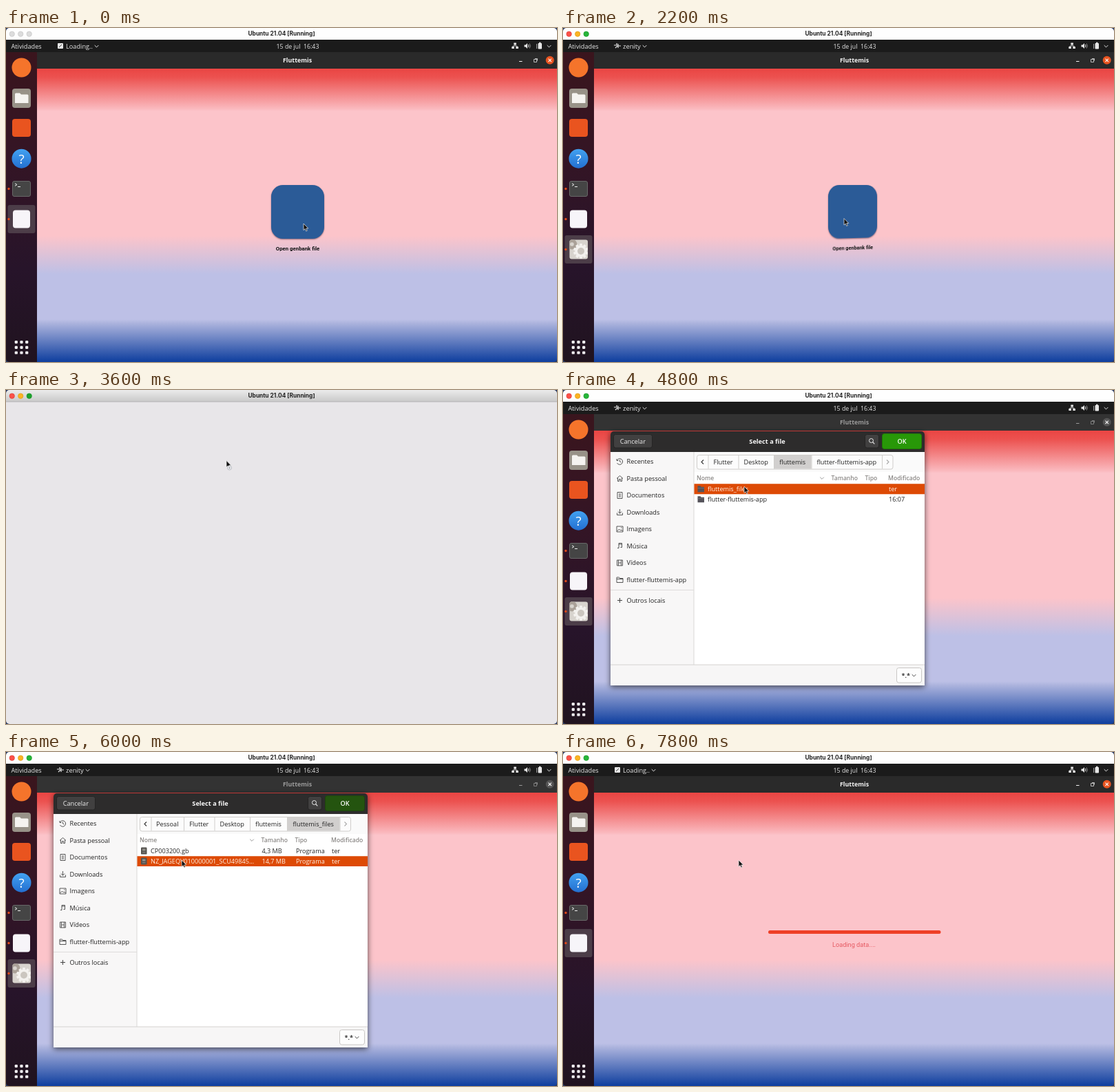
Write an HTML page with a canvas that moves like this. It is 800 by 485 pixels and loops after 8 s.

```html
<!DOCTYPE html>
<html lang="pt">
<head>
<meta charset="utf-8">
<title>Fluttemis</title>
<style>
html, body { margin: 0; width: 100%; height: 100%; overflow: hidden; background: #fff; }
canvas, #tile, #cursor { position: absolute; left: 0; top: 0; display: block; }
#tile { left: 385px; top: 228px; width: 77px; height: 100px; transform-origin: 0 0; }
#tile i { display: block; width: 77px; height: 78px; border-radius: 17px; background: #2b5b97; box-shadow: 0 1px 2px rgba(60, 30, 50, .55); }
#tile b { position: absolute; left: -10px; right: -10px; top: 87px; text-align: center; white-space: nowrap; font: 600 7.8px/12px Roboto, sans-serif; color: #111; }
#cursor { width: 14px; height: 18px; overflow: visible; }
</style>
</head>
<body>
<canvas id="stage" width="800" height="485"></canvas>
<div id="tile"><i></i><b>Open genbank file</b></div>
<svg id="cursor" viewBox="0 0 14 18">
  <path d="M0 0V9.6L2.2 7.6L3.7 11L5.3 10.3L3.8 7H6.8Z" fill="#111" stroke="#eee" stroke-width=".7"/>
  <g id="badge"><circle cx="4.5" cy="10.5" r="3" fill="#f4f4f6" stroke="#a9adb5" stroke-width=".8"/><path d="M3 10.5H6M4.5 9V12" stroke="#8d929a" stroke-width=".7"/></g>
</svg>
<script>
const LOOP = 8000, STEP = 200;
const FOCUS = 400, LAUNCH = 1800, DIALOG = 2600, BLANK = 3600, BLANK_END = 3800,
      PICK_DIR = 4600, OPEN_DIR = 5000, PICK_FILE = 5800, PRESS = 6000, CLOSE = 6200;
const UI = '"Open Sans", "Noto Sans", sans-serif';
const ORANGE = '#dd4a05', INK = '#222', PALE = '#e6e6e6';
const g = document.getElementById('stage').getContext('2d');
const tile = document.getElementById('tile');
const cursor = document.getElementById('cursor');
const badge = document.getElementById('badge');

function box(x, y, w, h, fill, r = 0, stroke) {
  g.beginPath();
  g.roundRect(x, y, w, h, r);
  if (fill) { g.fillStyle = fill; g.fill(); }
  if (stroke) { g.strokeStyle = stroke; g.lineWidth = 1; g.stroke(); }
}
function disc(x, y, r, fill, stroke, width = 1) {
  g.beginPath();
  g.arc(x, y, r, 0, 7);
  if (fill) { g.fillStyle = fill; g.fill(); }
  if (stroke) { g.strokeStyle = stroke; g.lineWidth = width; g.stroke(); }
}
function line(d, color, width = 1) {
  g.strokeStyle = color;
  g.lineWidth = width;
  g.stroke(new Path2D(d));
}
function shape(d, color) {
  g.fillStyle = color;
  g.fill(new Path2D(d));
}
function text(s, x, y, color = INK, size = 9.2, weight = 500, align = 'left', family = UI) {
  g.font = `${weight} ${size}px ${family}`;
  g.textAlign = align;
  g.fillStyle = color;
  g.fillText(s, x, y);
}
function fade(y0, y1, ...stops) {
  const f = g.createLinearGradient(0, y0, 0, y1);
  stops.forEach(([at, c]) => f.addColorStop(at, c));
  return f;
}
function at(x, y, draw) {
  g.save();
  g.translate(x, y);
  draw();
  g.restore();
}
const chevron = (x, y, color) => at(x, y, () => line('M-2.8-1.4L0 1.4L2.8-1.4', color));

function titleBar(t, blank) {
  box(0, 0, 800, 17, blank ? fade(0, 17, [0, '#ebebeb'], [1, '#c9c9c9']) : '#fefefe');
  if (blank) box(0, 16.5, 800, 1, '#b5b3b6');
  const colors = t < FOCUS ? ['#dcdcdc', '#dcdcdc', '#dcdcdc']
    : ['#fb5148', '#fbb422', blank ? '#1ea02d' : '#27b53a'];
  const rims = t < FOCUS ? ['#c6c6c6', '#c6c6c6', '#c6c6c6'] : ['#df3f38', '#dd9a1c', '#189a29'];
  colors.forEach((c, i) => disc(8.7 + i * 12.5, 8.7, 3.7, c, rims[i], .7));
  text('Ubuntu 21.04 [Running]', 400, 11.4, '#222', 8.4, 700, 'center', 'Inter, sans-serif');
}

function topBar(zenity) {
  box(0, 17, 800, 18, '#1b1b1b');
  text('Atividades', 7.5, 29.5, PALE);
  if (zenity) {
    line('M74 25H78V22M76 29L79 26H84M80 23V29', PALE, 1.2);
    text('zenity', 87, 29.5, PALE, 9.4);
    chevron(118.5, 26.5, PALE);
  } else {
    box(75, 22, 8, 8, PALE, 1);
    line('M77 28L81 24', '#444');
    text('Loading..', 87, 29.5, PALE);
    chevron(131.5, 26.5, PALE);
  }
  text('15 de jul  16:43', 423.5, 29.5, PALE, 8.8, 500, 'center');
  box(737.3, 21.5, 3.6, 3, PALE);
  box(734.3, 27, 3.6, 3, PALE);
  box(740.3, 27, 3.6, 3, PALE);
  line('M739 24V26H736V28M739 26H742V28', PALE, .8);
  shape('M752.5 24.5H754.5L757 22V30L754.5 27.5H752.5Z', PALE);
  line('M758.3 24Q760 26 758.3 28', PALE);
  line('M760 22.5Q762.8 26 760 29.5', '#8a8a8a');
  box(772.5, 22, 5.5, 8.5, PALE, 1);
  box(774, 20.8, 2.5, 1.5, PALE);
  line('M770.5 23V30', '#999');
  chevron(788.5, 26.5, PALE);
}

function gears() {
  box(9.5, 307.5, 26.5, 28, '#d8d4ce', 3);
  g.save();
  g.clip();
  disc(13, 314, 7, '#aaa198', '#aaa198');
  disc(13, 314, 2.8, '#d8d4ce');
  at(26, 324, () => {
    for (let i = 0; i < 10; i++) {
      g.rotate(Math.PI / 5);
      box(-2, -11, 4, 5, '#f3f1ee', 1);
    }
    disc(0, 0, 8.6, '#f3f1ee');
    disc(0, 0, 5, '#cbc6bf');
  });
  g.restore();
}

function dock(zenity) {
  box(0, 35, 45, 450, fade(35, 485, [0, '#3a151d'], [.35, '#341525'], [.7, '#27142a'], [1, '#20131f']));
  box(2.5, zenity ? 301 : 257, 40, 41, '#4c3d48', 3);
  disc(22.5, 57.5, 14, '#f5742b');
  box(9, 88, 27, 28, '#989288', 4);
  shape('M13 96Q13 94.5 14.5 94.5H20L22 96.5H31Q32.5 96.5 32.5 98V109H13Z', '#f5f3f0');
  box(9, 132, 27, 26, '#e9541f', 4);
  disc(22.5, 189.7, 14, fade(176, 204, [0, '#42a1f1'], [1, '#236fd0']));
  text('?', 22.5, 196.5, '#fff', 19, 400, 'center');
  box(9.5, 222.5, 26, 22, '#454545', 2.5, '#686868');
  line('M13 225.7L16 227.5L13 229.3M17 230.5H21', '#eee');
  box(10, 264.5, 25, 26, '#f7f5f9', 4);
  if (zenity) gears();
  [233.5, 277.5, zenity && 321.5].forEach(y => y && disc(4, y, 1.7, '#e0491a'));
  for (let i = 0; i < 9; i++) box(12.7 + i % 3 * 7.7, 454 + Math.floor(i / 3) * 7.7, 4.2, 4.2, '#f3f0f3', 1.2);
}

function appWindow(active) {
  box(45, 35, 755, 24, active ? '#2a2a2a' : '#333');
  const ink = active ? '#f4f4f4' : '#9b9b9b';
  text('Fluttemis', 423, 50.3, ink, 8.9, 700, 'center');
  line('M745 48.5H749.5', ink);
  line('M766.5 45.5H770.5V49.5H766.5ZM768 44.5H771.5V47.5', ink, .7);
  disc(789.7, 46.8, 6, active ? '#e95420' : '#555');
  line('M787.5 44.6L791.9 49M791.9 44.6L787.5 49', '#f6f6f6', 1.1);
  box(45, 59, 755, 426, fade(59, 485, [0, '#ea4543'], [.03, '#ec5250'], [.135, '#fab7bc'], [.145, '#fcc4ca'],
    [.57, '#fcc4ca'], [.7, '#bdc0e6'], [.855, '#bdc0e6'], [.87, '#a9b1dc'], [1, '#0e3e9e']));
}

function loading() {
  box(298, 259, 250.5, 5, '#ee4027', 2.5);
  text('Loading data....', 422.5, 282.5, '#e65a62', 9.2, 400, 'center', 'Roboto, sans-serif');
}

// Each icon is a stroke inside a square from -5 to 5.
const PLACES = [
  ['Recentes', 'M-4-2A4.3 4.3 0 1 1-4 2M-4.5-4V-1.5H-2M0-2.5V0L2 1'],
  ['Pasta pessoal', 'M-4.5 0L0-4L4.5 0M-3-1V4H-1V1H1V4H3V-1'],
  ['Documentos', 'M-3.5-4.5H3.5V4.5H-3.5ZM-1.5-2H1.5M-1.5 0H1.5M-1.5 2H1.5'],
  ['Downloads', 'M0-4.5V1.5M-2.7-1L0 1.7L2.7-1M-4 1V4H4V1'],
  ['Imagens', 'M-4.5-4H4.5V4H-4.5ZM-4 3L-1 0L1 2L2.5 1L4 3M1.5-2H3'],
  ['Música', 'M-1.5 3V-4H3V2M-3.5 3H-1.5M1 2H3M-1.5-2.5H3'],
  ['Vídeos', 'M-4-4H4V4H-4ZM-2-4V4M2-4V4M-2 0H2'],
  ['flutter-fluttemis-app', 'M-4.5-3.5H-1L0-2H4.5V4H-4.5ZM-4.5-1H4.5']
];

function sidebar() {
  box(69, 90, 121, 309, '#f8f7f7');
  box(189.5, 90, 1, 309, '#d9d7d6');
  PLACES.forEach(([name, icon], i) => {
    const y = 104 + i * 24.5;
    at(82.5, y, () => line(icon, '#444', .9));
    text(name, 92.5, y + 3.3);
  });
  box(69, 290, 121, 1, '#dedcdb');
  line('M79 305.5H86M82.5 302V309', '#444');
  text('Outros locais', 92.5, 309);
}

function pathBar(edges, names, active) {
  const end = edges[edges.length - 1] + 16;
  box(194.5, 94.5, end - 194.5, 20.5, '#fcfcfc', 3, '#cfcdcb');
  names.forEach((name, i) => {
    const a = edges[i], b = edges[i + 1];
    if (i === active) box(a, 95, b - a, 19.5, '#d1cfce');
    text(name, (a + b) / 2, 107.7, INK, 9.2, 500, 'center');
  });
  edges.forEach(x => box(x, 95, 1, 19.5, '#cfcdcb'));
  line('M204 101.5L201 104.5L204 107.5', '#333', 1.1);
  line(`M${end - 9} 101.5L${end - 6} 104.5L${end - 9} 107.5`, '#aaa', 1.1);
}

function headers(shift) {
  const h = (s, x) => text(s, x, 131, '#8b8886', 8.6, 600);
  h('Nome', 194);
  chevron(376 - shift, 128, '#999');
  h('Tamanho', 389.5 - shift);
  h('Tipo', 438.5 - shift);
  h('Modificado', 472);
}

function row(i, folder, cells, picked) {
  const y = 136.3 + i * 14.9, xs = [210, 371.5, 421, 473];
  if (picked) box(190.5, y, 334.5, 14.9, ORANGE);
  if (folder) {
    shape(`M195.5 ${y + 3}H199.5L200.5 ${y + 4.5}H205V${y + 12}H195.5Z`, '#55535a');
    box(195.5, y + 6, 9.5, .8, '#77757b');
  } else {
    box(196, y + 2.3, 8.5, 10, '#55534f', 1.2);
    box(198, y + 4.3, 4.5, 3, '#94918c');
    box(198, y + 9, 4.5, 1, '#94918c');
  }
  cells.forEach((s, k) => text(s, xs[k], y + 10.8, picked ? '#fff3ea' : INK, 9.15));
}

function dialog(t) {
  g.save();
  g.shadowColor = 'rgba(0,0,0,.65)';
  g.shadowBlur = 9;
  g.shadowOffsetY = 2;
  box(69, 60, 456, 369, '#2d2c2c', [5, 5, 0, 0]);
  g.restore();
  box(73.5, 64.5, 56, 19.5, '#414040', 3, '#252424');
  text('Cancelar', 101.3, 77.5, '#eee', 9.2, 500, 'center');
  text('Select a file', 296.5, 77.5, '#fafafa', 9.2, 700, 'center');
  box(438.5, 64.5, 20, 19.5, '#414040', 3, '#252424');
  disc(447.5, 73.5, 3, null, '#eee');
  line('M449.7 75.7L452.3 78.3', '#eee', 1.2);
  box(463.5, 63.5, 57, 22, t >= PRESS ? '#24540f' : '#289808', 3, t >= PRESS ? '#1d440d' : '#1f7906');
  text('OK', 492, 77.7, '#fff', 9.2, 600, 'center');

  box(190, 90, 335, 309, '#fff');
  box(190, 90, 335, 29, '#fafafa');
  sidebar();
  const inFiles = t >= OPEN_DIR, inProject = t >= BLANK;
  if (inFiles) {
    pathBar([210.5, 258, 302.5, 354, 408, 484.5], ['Pessoal', 'Flutter', 'Desktop', 'fluttemis', 'fluttemis_files'], 4);
    row(0, false, ['CP003200.gb', '4,3 MB', 'Programa', 'ter'], t < PICK_FILE);
    row(1, false, ['NZ_JAGEQV010000001_SCU49845…', '14,7 MB', 'Programa', 'ter'], t >= PICK_FILE);
  } else {
    pathBar([210.5, 254.5, 306, 360.5, 463], ['Flutter', 'Desktop', 'fluttemis', 'flutter-fluttemis-app'], inProject ? 2 : 3);
    if (inProject) {
      row(0, true, ['fluttemis_files', '', '', 'ter'], t >= PICK_DIR);
      row(1, true, ['flutter-fluttemis-app', '', '', '16:07']);
    }
  }
  headers(inFiles ? 19 : 0);

  box(69, 399, 456, 30, '#f7f6f6');
  box(69, 398.5, 456, 1, '#d5d3d2');
  box(484.5, 403.5, 36, 21.5, '#fdfdfd', 3, '#c9c7c5');
  text('*.*', 491.5, 418, INK, 9.2, 600);
  chevron(509.5, 414.5, '#444');
}

// Pointer keys: time, x, y.
const PATH = [[0, 432, 284], [1000, 432, 284], [1800, 408, 276.5], [2400, 408, 276.5], [3400, 320, 102.5],
  [3800, 320, 102.5], [4600, 263, 140], [5000, 263, 140], [5200, 260, 145.5], [5400, 260, 145.5], [5800, 255, 157], [LOOP, 255, 157]];

function pointer(t) {
  const i = PATH.findIndex(k => k[0] > t);
  const [t0, x0, y0] = PATH[i - 1], [t1, x1, y1] = PATH[i];
  const u = (t - t0) / (t1 - t0), e = u * u * (3 - 2 * u);
  return [x0 + (x1 - x0) * e, y0 + (y1 - y0) * e];
}

function draw(t) {
  const blank = t >= BLANK && t < BLANK_END;
  const zenity = t >= LAUNCH && t < CLOSE;
  const open = t >= DIALOG && t < CLOSE;
  box(0, 0, 800, 485, '#26375f');
  g.save();
  g.beginPath();
  g.roundRect(0, 0, 800, 485, 5);
  g.clip();
  if (blank) box(0, 17, 800, 468, '#e8e6e9');
  else {
    appWindow(!open);
    topBar(zenity);
    dock(zenity);
    if (open) dialog(t);
    if (t >= CLOSE) loading();
  }
  titleBar(t, blank);
  g.restore();

  // The button swings about its left edge.
  const angle = .165 * (1 - Math.cos(t / 2200 * Math.PI));
  tile.style.display = t < DIALOG ? 'block' : 'none';
  tile.style.transform = angle ? `perspective(1000px) rotateY(${angle}rad)` : 'none';

  const [x, y] = pointer(t);
  cursor.style.transform = `translate(${x}px, ${y}px)`;
  badge.style.display = blank ? '' : 'none';
}

const start = performance.now();
function tick() {
  const t = (performance.now() - start) % LOOP;
  draw(Math.floor(t / STEP) * STEP);
  requestAnimationFrame(tick);
}
tick();
</script>
</body>
</html>
```
